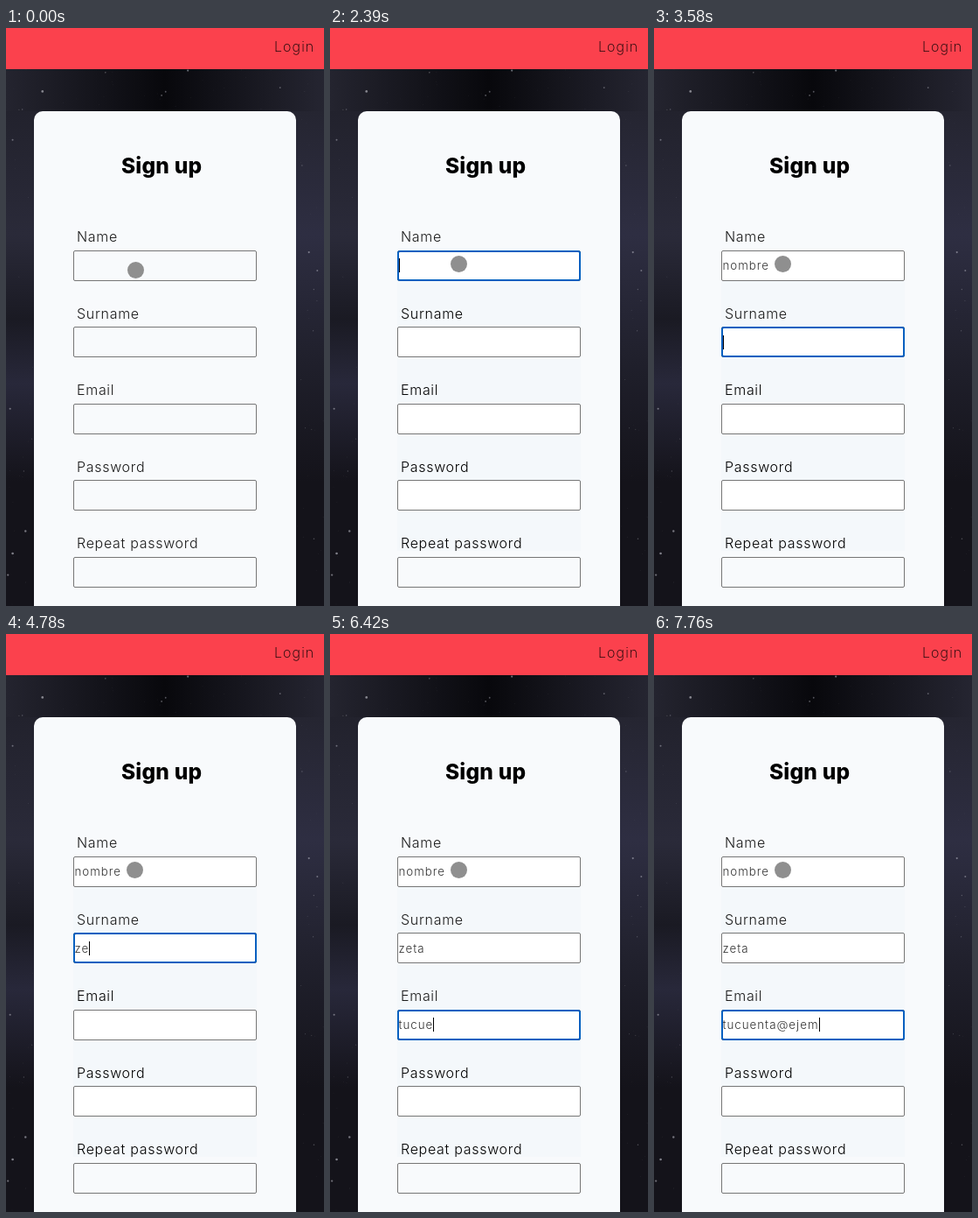
These frames come from a looping animation (364x660 px, 8 s). An HTML page:

```html
<!DOCTYPE html>
<html lang="en">
<head>
<meta charset="utf-8">
<title>Sign up</title>
<style>
  html, body { margin: 0; width: 100%; height: 100%; overflow: hidden; background: #14141b; }
  svg { display: block; }
  text { font-family: Inter, "Open Sans", sans-serif; white-space: pre; }
  .title { font-size: 24.5px; font-weight: 800; letter-spacing: .2px; }
  .login { font-size: 16px; font-weight: 200; letter-spacing: 1.1px; }
  .label { font-size: 16px; font-weight: 300; letter-spacing: .7px; fill: #1a1a1a; }
  .label.pending { font-weight: 350; fill: #000; }
  .value { font-size: 13.3px; font-weight: 300; letter-spacing: 1px; fill: #333; }
  .box { fill: #f8fafc; stroke: #767676; }
  .box.painted { fill: #fff; }
  #focus { fill: none; stroke: #0060c0; stroke-width: 2px; }
</style>
</head>
<body>
<svg width="364" height="660" viewBox="0 0 364 660">
  <defs>
    <linearGradient id="top">
      <stop offset="0" stop-color="#24242f"/>
      <stop offset=".5" stop-color="#08080c"/>
      <stop offset="1" stop-color="#252531"/>
    </linearGradient>
    <linearGradient id="left" x2="0" y2="1">
      <stop offset="0" stop-color="#22222d"/>
      <stop offset=".25" stop-color="#2a2a39"/>
      <stop offset=".42" stop-color="#1a1a23"/>
      <stop offset=".55" stop-color="#28283a"/>
      <stop offset=".75" stop-color="#14131a"/>
    </linearGradient>
    <linearGradient id="right" x2="0" y2="1">
      <stop offset="0" stop-color="#252531"/>
      <stop offset=".25" stop-color="#2e2e42"/>
      <stop offset=".5" stop-color="#20202c"/>
      <stop offset=".75" stop-color="#14131a"/>
    </linearGradient>
  </defs>
  <rect y="95" width="182" height="565" fill="url(#left)"/>
  <rect x="182" y="95" width="182" height="565" fill="url(#right)"/>
  <rect y="47" width="364" height="48" fill="url(#top)"/>
  <g id="stars" fill="#c9c9d2"></g>
  <rect width="364" height="47" fill="#fb414d"/>
  <text class="login" x="307" y="27">Login</text>
  <rect x="32" y="95" width="300" height="600" rx="10" fill="#f8fafc"/>
  <text class="title" x="132" y="166">Sign up</text>
  <rect id="tint" x="77" y="289" width="210" height="308" fill="#f4f8fb"/>
  <g id="form"></g>
  <rect id="focus" x="78" width="208" height="33" rx="2"/>
  <rect id="caret" width="1" height="16"/>
  <circle id="pointer" r="9.5" fill="#8f8f8f"/>
</svg>
<script>
const LOOP = 8000;
const TICK = 149.1;   // the screen refreshes on this beat
const PITCH = 87.5;   // distance between fields
const BLINK = 3.25;   // half a caret blink, in ticks

const byId = id => document.getElementById(id);
const show = (node, visible) => { node.style.display = visible ? '' : 'none'; };

function set(node, attrs) {
  for (const key in attrs) node.setAttribute(key, attrs[key]);
  return node;
}

function add(parent, tag, attrs, content = '') {
  const node = document.createElementNS('http://www.w3.org/2000/svg', tag);
  node.textContent = content;
  return parent.appendChild(set(node, attrs));
}

let seed = 41;
const random = () => (seed = seed * 16807 % 2147483647) / 2147483647;
for (let i = 0; i < 400; i++) {
  const size = random() ** 6;
  add(byId('stars'), 'circle', {
    cx: random() * 364, cy: 47 + random() * 613, r: .4 + size, opacity: .15 + size * .5,
  });
}

const fields = ['Name', 'Surname', 'Email', 'Password', 'Repeat password'].map((name, i) => {
  const form = byId('form');
  const top = Math.floor(254 + PITCH * i);
  const baseline = Math.round(244 + PITCH * i);
  return {
    top,
    label: add(form, 'text', { class: 'label', x: 81, y: baseline }, name),
    box: add(form, 'rect', { class: 'box', x: 77.5, y: top + .5, width: 209, height: 34, rx: 1.5 }),
    value: add(form, 'text', { class: 'value', x: 78.5, y: baseline + 32 }),
  };
});

// One group of keys per tick; "-" is a tick without a key.
const entries = [
  { focus: 3, typing: 17, keys: 'no - mb - r e' },
  { focus: 24, typing: 32, keys: 'ze ta' },
  { focus: 35, typing: 39, keys: 't u c u e n ta - - @ - e je m' },
];

const typed = ({ typing, keys }, tick) =>
  keys.split(' ').slice(0, Math.max(0, tick - typing + 1)).join('').replaceAll('-', '');

function render(time) {
  const tick = Math.floor(time / TICK);
  const active = entries.filter(entry => entry.focus <= tick).length - 1;
  const started = active >= 0;

  fields.forEach(({ label, box, value }, i) => {
    value.textContent = entries[i] ? typed(entries[i], tick) : '';
    label.classList.toggle('pending', started && i > active);
    box.classList.toggle('painted', started && i < fields.length - 1);
  });

  set(byId('pointer'), tick < 1 ? { cx: 148.5, cy: 276.5 } : { cx: 147.5, cy: 269.5 });
  show(byId('tint'), started);
  show(byId('focus'), started);
  show(byId('caret'), started);
  if (!started) return;

  const { top, value } = fields[active];
  const { focus, typing } = entries[active];
  const blinkOn = Math.floor((tick - focus + .8) / BLINK) % 2 === 0;
  const width = value.textContent ? value.getComputedTextLength() : 0;
  set(byId('focus'), { y: top + 1 });
  set(byId('caret'), { x: Math.round(78.6 + width), y: Math.round(263 + PITCH * active) });
  show(byId('caret'), tick >= typing || blinkOn);
}

function frame() {
  render(performance.now() % LOOP);
  requestAnimationFrame(frame);
}
frame();
</script>
</body>
</html>
```
